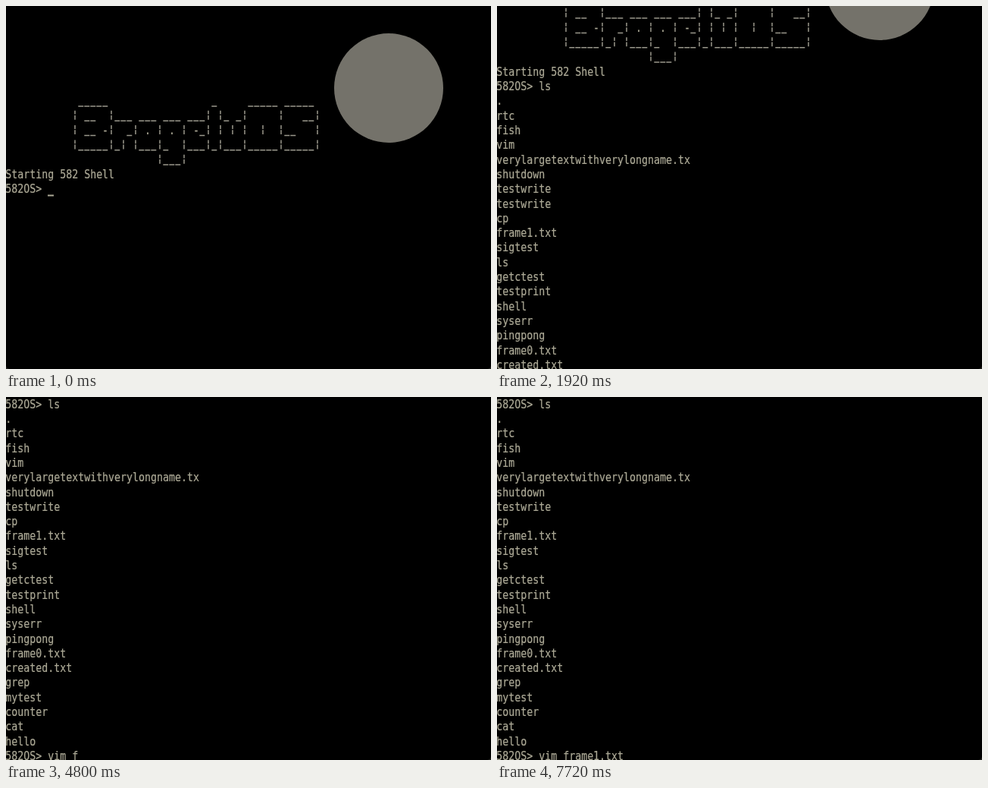
An HTML page that plays this animation: 640 by 478 pixels, repeating every 8 s.

```html
<!DOCTYPE html>
<html lang="en">
<head>
<meta charset="utf-8">
<title>Terminal session</title>
<style>
  html, body { margin: 0; width: 100%; height: 100%; overflow: hidden; background: #000; }
  svg { display: block; }
  text {
    font: 13.29px "DejaVu Sans Mono", monospace;
    white-space: pre;
    fill: #aca996;
    stroke: #aca996;
    stroke-width: .2;
  }
  .bars { stroke: #9a988c; stroke-width: 1.5; fill: none; }
</style>
</head>
<body>
<svg id="stage" width="640" height="478" viewBox="0 0 640 478">
  <defs>
    <g id="log"><circle cx="505" cy="108" r="72" fill="#74726a"/></g>
  </defs>
  <rect width="640" height="478" fill="#20201c"/>
  <rect y="-10" width="640" height="488" rx="5"/>
  <svg id="upper" width="640" height="478"><use href="#log"/></svg>
  <svg id="lower" width="640" height="478"><use href="#log"/></svg>
  <rect id="cursor" width="8" height="2" fill="#aca996"/>
</svg>
<script>
const LOOP = 8000, COL = 8, ROW = 19.3, LEFT = -0.8, TOP = 0.3;
const PROMPT = '582OS> ';
const FIRST = 12, LAST = 36; // the two prompt lines in the log

const banner = [
  ' _____                 _     _____ _____',
  '| __  |___ ___ ___ ___| |_ _|     |   __|',
  '| __ -|  _| . | . | -_| | | |  |  |__   |',
  '|_____|_| |___|_  |___|_|___|_____|_____|',
  '              |___|'
].map(s => ' '.repeat(11) + s);

const files = ('. rtc fish vim verylargetextwithverylongname.tx shutdown testwrite cp ' +
  'frame1.txt sigtest ls getctest testprint shell syserr pingpong frame0.txt ' +
  'created.txt grep mytest counter cat hello').split(' ');

const lines = [...Array(6).fill(''), ...banner, 'Starting 582 Shell', PROMPT, ...files, PROMPT];

// [time, typed text]
const firstKeys = [[0, ''], [1600, 'l'], [1760, 'ls']];
const lastKeys = [
  [0, ''], [3560, 'v'], [3680, 'vi'], [3760, 'vim '],
  [4800, 'vim f'], [4920, 'vim fr'], [5000, 'vim fra'], [5120, 'vim fram'],
  [5720, 'vim frame'], [6080, 'vim fram'], [6160, 'vim frame'],
  [6480, 'vim frame1'], [6640, 'vim frame1.'],
  [7480, 'vim frame1.t'], [7600, 'vim frame1.tx'], [7720, 'vim frame1.txt']
];

// [time, lines printed, split row, first line above split, first line below]
const scrolls = [
  [0, 13, 25, 0, 0],
  [1880, 13, 6, 7, 0],
  [1920, 31, 13, 7, 6],
  [1960, 37, 25, 12, 12]
];
const blinks = [160, 480, 720, 1040, 1320, 1600];

const $ = id => document.getElementById(id);
const at = (list, t) => list.filter(e => e[0] <= t).pop();

function add(parent, name, attrs) {
  const el = document.createElementNS('http://www.w3.org/2000/svg', name);
  for (const key in attrs) el.setAttribute(key, attrs[key]);
  return parent.appendChild(el);
}

// Underscores and broken bars of one banner line
function barPath(line) {
  let d = '';
  [...line].forEach((c, i) => {
    const x = i * COL - 1;
    if (c === '_') d += `M${x + .3} 15.8h7`;
    if (c === '|') d += `M${x + 4} 2.4v4.8m0 1.4v5.8`;
  });
  return d;
}

const rows = lines.map((line, i) => {
  const g = add($('log'), 'g', { transform: `translate(0 ${TOP + i * ROW})` });
  const isArt = i > 5 && i < 11;
  const text = add(g, 'text', { x: LEFT, y: 0, transform: 'translate(0 14.4) scale(1 1.22)' });
  text.textContent = isArt ? line.replace(/[_|]/g, ' ') : line;
  if (isArt) add(g, 'path', { class: 'bars', d: barPath(line) });
  return { g, text };
});

function setView(id, from, to, first) {
  const view = $(id);
  view.setAttribute('y', from * ROW);
  view.setAttribute('height', Math.max(0, (to - from) * ROW));
  view.firstElementChild.setAttribute('y', -(first + from) * ROW);
}

function draw(t) {
  const [, count, split, above, below] = at(scrolls, t);
  const typed = at(firstKeys, t)[1];
  rows[FIRST].text.textContent = PROMPT + typed;
  rows[LAST].text.textContent = PROMPT + at(lastKeys, t)[1];
  rows.forEach((row, i) => row.g.setAttribute('display', i < count ? 'inline' : 'none'));
  setView('upper', 0, split, above);
  setView('lower', split, 25, below);

  const lit = blinks.filter(b => b <= t).length % 2 === 0 && t < 1920;
  const cursor = $('cursor');
  cursor.setAttribute('x', (PROMPT.length + typed.length) * COL - 1);
  cursor.setAttribute('y', TOP + FIRST * ROW + 16.6);
  cursor.setAttribute('display', lit ? 'inline' : 'none');
}

const start = performance.now();
function tick() {
  draw((performance.now() - start) % LOOP);
  requestAnimationFrame(tick);
}
tick();
</script>
</body>
</html>
```
